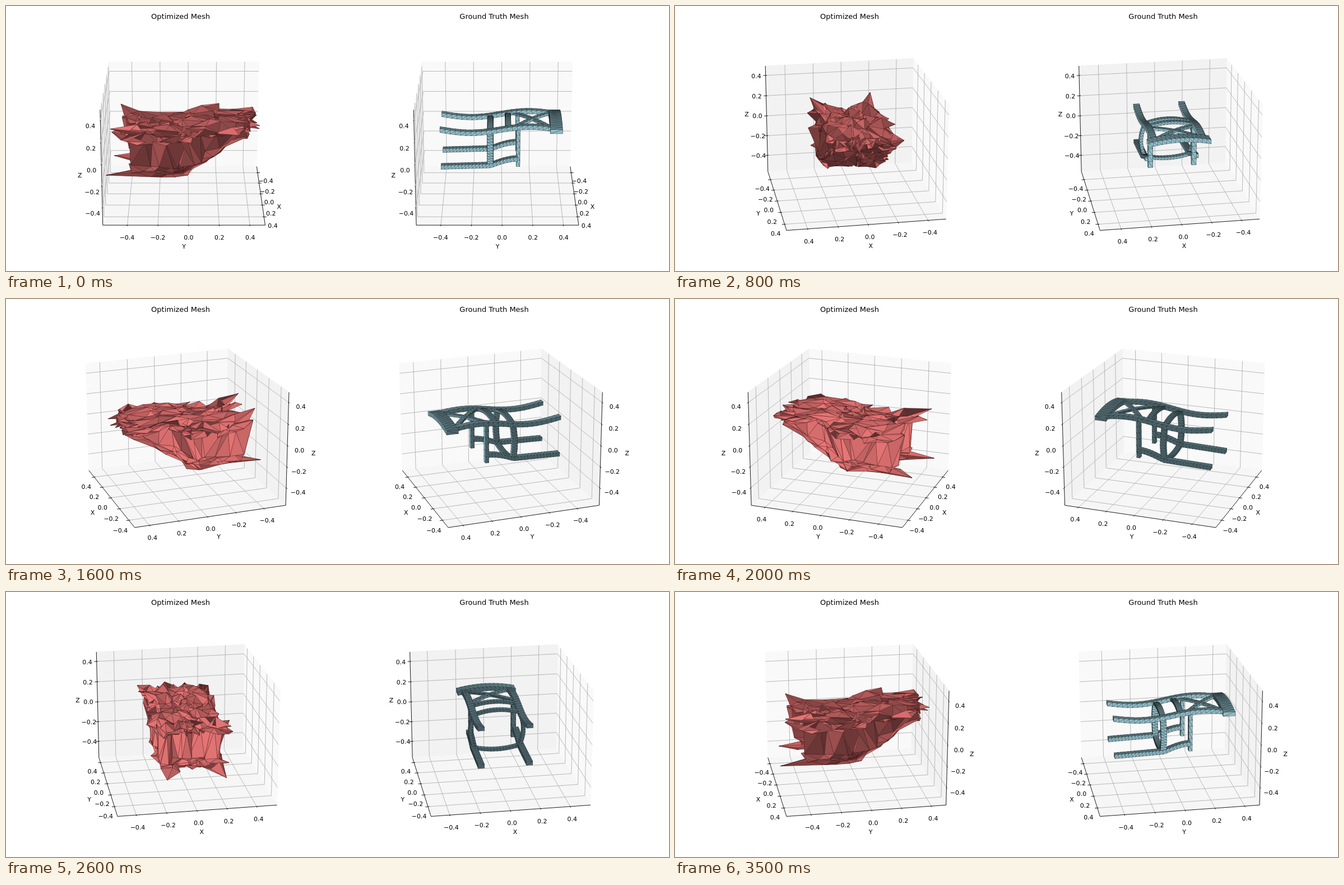
An HTML page with a canvas for the animation above (3.6 s loop, 1183 by 473 pixels).

```html
<!DOCTYPE html>
<html lang="en">
<head>
<meta charset="utf-8">
<title>Mesh turntable</title>
<style>
html, body { margin: 0; width: 100%; height: 100%; overflow: hidden; background: #fff; }
canvas { display: block; width: 1183px; height: 473px; }
</style>
</head>
<body>
<canvas id="stage" width="1183" height="473"></canvas>
<script>
const ctx = document.getElementById('stage').getContext('2d');
const FONT = '"DejaVu Sans", sans-serif';
const SCALE = 2335, CENTER_X = 317.6, CENTER_Y = 239.5, PANEL_STEP = 559.4, DIST = 10;
const ELEV = 20 * Math.PI / 180, SIN_E = Math.sin(ELEV), COS_E = Math.cos(ELEV);

// Axis box in world units; data value v sits at (v - MID) * UNIT.
const HALF = [0.5953, 0.5953, 0.4465];
const MID = [0.0075, -0.03, -0.037];
const UNIT = HALF.map(h => h / 0.53);
const DELTA = HALF.map(h => h * 0.16);
const TICKS = [-0.4, -0.2, 0, 0.2, 0.4];
const TICK_PAD = 0.70, NAME_PAD = 1.521;

const add = (p, q) => p.map((v, i) => v + q[i]);
const sub = (p, q) => p.map((v, i) => v - q[i]);
const dot = (p, q) => p[0] * q[0] + p[1] * q[1] + p[2] * q[2];
const cross = (p, q) => [p[1] * q[2] - p[2] * q[1], p[2] * q[0] - p[0] * q[2], p[0] * q[1] - p[1] * q[0]];
const unit = p => { const l = Math.hypot(...p) || 1; return p.map(v => v / l); };
const mean = ps => ps.reduce(add).map(v => v / ps.length);
const put = (p, i, v) => { const q = p.slice(); q[i] = v; return q; };
const mix = (a, b, t) => a + (b - a) * t;
const clamp = t => Math.min(1, Math.max(0, t));
const bulge = t => 4 * t * (1 - t);

function random(seed) {
  return () => {
    seed = (seed + 0x6D2B79F5) | 0;
    let t = Math.imul(seed ^ (seed >>> 15), 1 | seed);
    t = (t + Math.imul(t ^ (t >>> 7), 61 | t)) ^ t;
    return ((t ^ (t >>> 14)) >>> 0) / 4294967296;
  };
}

const LIGHT = [-0.667, -0.667, 0.333];
function face(points, outward, base, side) {
  const [a, b, c] = points.map(p => [p[0], p[1], p[2] * 4 / 3]);
  const n = unit(cross(sub(b, a), sub(c, a)));
  const facing = dot(n, outward) < 0 ? -side : side;
  const k = 0.36 + 0.31 * (1 + facing * dot(n, LIGHT));
  return { points, fill: `rgb(${base.map(v => Math.round(v * k))})` };
}

// Height of the long S-shaped posts, shared by both meshes.
const postZ = y => 0.144 + 0.0245 * Math.sin(7.1 * (y - 0.02));

// ---- spiky mesh: a noisy sphere pressed into a slab with a wedge below ----
function spikyMesh() {
  const N = 12, rnd = random(11), verts = new Map(), tris = [];
  const jitter = s => (rnd() + rnd() - 1) * s;

  function place(i, j, k) {
    const top = Math.max(Math.abs(i), Math.abs(j), Math.abs(k));
    const [cx, cy, cz] = [i / top, j / top, k / top];
    const upper = cz >= 0;
    const h = (upper ? 1 : -1) * Math.max(Math.abs(cz), 0.15) ** 0.3;
    const corner = Math.min(Math.abs(cx), -cy, Math.abs(cz));
    let y = 0.47 * cy;
    if (cy < -0.8) y = Math.abs(cx) < 0.6 ? -0.31 : upper ? -0.45 : -0.4;
    if (corner > 0.99) y = -0.56;
    const floor = mix(-0.21, 0.1, clamp(y / 0.42));
    const z = mix(floor, postZ(y) + 0.02, (h + 1) / 2);
    const spike = rnd() < 0.07 ? 1.8 : 1;
    return upper
      ? [0.235 * cx + jitter(0.06) * spike, y + jitter(0.11), z + jitter(0.045) * spike]
      : [0.225 * cx + jitter(0.05) * spike, y + jitter(0.05), z + jitter(0.025)];
  }
  function vertex(i, j, k) {
    const key = [i, j, k].join();
    if (!verts.has(key)) verts.set(key, { dir: unit([i, j, k]), pos: place(i, j, k) });
    return verts.get(key);
  }
  for (const sx of [1, -1]) for (const sy of [1, -1]) for (const sz of [1, -1]) {
    const v = (i, j) => vertex(sx * i, sy * j, sz * (N - i - j));
    for (let i = 0; i < N; i++) for (let j = 0; i + j < N; j++) {
      tris.push([v(i, j), v(i + 1, j), v(i, j + 1)]);
      if (i + j < N - 1) tris.push([v(i + 1, j), v(i + 1, j + 1), v(i, j + 1)]);
    }
  }
  return tris.map(t => {
    const normal = ([a, b, c]) => cross(sub(b, a), sub(c, a));
    const pos = t.map(v => v.pos), dir = t.map(v => v.dir);
    // Keep the sphere's winding so folded faces turn dark.
    const turn = Math.sign(dot(normal(dir), mean(dir)));
    return face(pos, normal(pos).map(v => v * turn), [238, 121, 121], 1);
  });
}

// ---- chair frame ----
function chairMesh() {
  const faces = [], cx = -0.015;
  function quad([a, b, c, d], out) {
    for (const t of [[a, b, c], [a, c, d]]) faces.push(face(t, out, [165, 214, 227], -1));
  }
  // Sweeps a box section with half-vectors a and b along path(t), t in 0..1.
  function beam(path, a, b, n) {
    const mids = Array.from({ length: n + 1 }, (_, i) => path(i / n));
    const rings = mids.map(c => [add(add(c, a), b), add(sub(c, a), b), sub(sub(c, a), b), sub(add(c, a), b)]);
    for (let i = 0; i < n; i++) for (let k = 0; k < 4; k++) {
      const m = (k + 1) % 4, q = [rings[i][k], rings[i][m], rings[i + 1][m], rings[i + 1][k]];
      quad(q, sub(mean(q), mean([mids[i], mids[i + 1]])));
    }
    quad(rings[0], sub(mids[0], mids[1]));
    quad(rings[n], sub(mids[n], mids[n - 1]));
  }
  const legZ = y => -0.15 + 0.03 * (y + 0.43) + 0.047 * Math.sin(clamp((y + 0.05) / 0.2) * Math.PI / 2);
  const rail = (x, y0, y1, z) =>
    beam(t => { const y = mix(y0, y1, t); return [x, y, z(y)]; }, [0.023, 0, 0], [0, 0, 0.015], 22);
  const across = (y, z, arch, half = 0.17, wide = 0.02, thick = 0.01) =>
    beam(t => [cx + mix(-half, half, t), y, z + arch * bulge(t)], [0, wide, 0], [0, 0, thick], 14);

  for (const s of [-1, 1]) {
    rail(cx + s * 0.181, -0.43, 0.42, postZ);
    rail(cx + s * 0.181, -0.425, 0.15, legZ);
    beam(t => [cx + s * 0.167, 0.155, mix(0.15, -0.15, t)], [0.017, 0, 0], [0, 0.013, 0], 6);
    beam(t => [cx + s * (0.172 + 0.033 * bulge(t)), -0.055, mix(0.12, -0.145, t)],
      [0.012, 0, 0], [0, 0.021, 0], 12);
    beam(t => [cx + s * mix(-0.17, 0.17, t), mix(0.13, 0.4, t), 0.153 + 0.014 * bulge(t)],
      [0.011, -s * 0.013, 0], [0, 0, 0.008], 10);
  }
  across(-0.055, 0.125, 0.028);
  across(-0.055, -0.142, -0.022);
  across(0.08, 0.148, 0.025);
  across(0.44, 0.146, 0.026, 0.23, 0.045, 0.016);
  return faces;
}

const panels = [
  { title: 'Optimized Mesh', titleX: 311.5, x: CENTER_X, faces: spikyMesh(), edge: 'rgba(25,5,5,.65)', width: 0.38 },
  { title: 'Ground Truth Mesh', titleX: 871, x: CENTER_X + PANEL_STEP, faces: chairMesh(), edge: 'rgba(0,0,0,.7)', width: 0.32 }
];

// ---- drawing ----
function camera(az, x0) {
  const s = Math.sin(az), c = Math.cos(az);
  return p => {
    const near = c * p[0] + s * p[1];
    const depth = near * COS_E + p[2] * SIN_E;
    const k = SCALE / (DIST - depth);
    return [x0 + (c * p[1] - s * p[0]) * k, CENTER_Y - (p[2] * COS_E - near * SIN_E) * k, depth];
  };
}

function trace(pts, close) {
  ctx.beginPath();
  for (const p of pts) ctx.lineTo(p[0], p[1]);
  if (close) ctx.closePath();
}
function line(pts, color) {
  trace(pts);
  ctx.strokeStyle = color;
  ctx.lineWidth = 0.88;
  ctx.stroke();
}

function drawAxes(az, view) {
  const eye = [Math.cos(az), Math.sin(az), 1];
  const front = HALF.map((h, i) => eye[i] < -1e-9 ? -h : h);
  const back = front.map(v => -v);

  ['#f9f9f9', '#f2f2f2', '#f6f6f6'].forEach((color, i) => {
    const j = (i + 1) % 3, k = (i + 2) % 3;
    const p = put(back, j, front[j]);
    trace([back, p, put(p, k, front[k]), put(back, k, front[k])].map(view), true);
    ctx.fillStyle = ctx.strokeStyle = color;
    ctx.lineWidth = 1;
    ctx.fill();
    ctx.stroke();
  });

  ctx.font = `10.95px ${FONT}`;
  for (let i = 0; i < 3; i++) {
    const dir = i === 0 ? 1 : 0, j = (i + 1) % 3, k = (i + 2) % 3;
    const edge = put(back, dir, front[dir]);
    const push = (p, pad) => p.map((v, a) => a === i ? v : v + Math.sign(v) * DELTA[a] * pad);
    const at = TICKS.map(v => (v - MID[i]) * UNIT[i]);

    line([put(edge, i, -HALF[i]), put(edge, i, HALF[i])].map(view), '#000');
    for (const v of at) {
      const p = put(back, i, v);
      line([put(p, j, front[j]), p, put(p, k, front[k])].map(view), '#b0b0b0');
    }
    ctx.fillStyle = '#000';
    at.forEach((v, n) => {
      const p = put(edge, i, v), d = Math.sign(edge[dir]) * DELTA[dir];
      line([put(p, dir, p[dir] - 0.1 * d), put(p, dir, p[dir] + 0.2 * d)].map(view), '#000');
      const [x, y] = view(push(p, TICK_PAD));
      ctx.fillText(TICKS[n].toFixed(1).replace('-', '\u2212'), x, y + 8.3);
    });
    const [x, y] = view(push(put(edge, i, 0), NAME_PAD));
    ctx.fillText('XYZ'[i], x, y + 2.85);
  }
}

function drawFaces(panel, view) {
  const shown = panel.faces.map(f => {
    const pts = f.points.map(view);
    return { pts, fill: f.fill, depth: pts[0][2] + pts[1][2] + pts[2][2] };
  }).sort((a, b) => a.depth - b.depth);
  ctx.strokeStyle = panel.edge;
  ctx.lineWidth = panel.width;
  for (const f of shown) {
    trace(f.pts, true);
    ctx.fillStyle = f.fill;
    ctx.fill();
    ctx.stroke();
  }
}

function draw(deg) {
  const az = deg * Math.PI / 180;
  ctx.fillStyle = '#fff';
  ctx.fillRect(0, 0, 1183, 473);
  ctx.textAlign = 'center';
  ctx.lineJoin = 'round';
  for (const panel of panels) {
    const view = camera(az, panel.x);
    drawAxes(az, view);
    drawFaces(panel, view);
    ctx.font = `13px ${FONT}`;
    ctx.fillStyle = '#000';
    ctx.fillText(panel.title, panel.titleX, 23);
  }
}

let shownStep = -1;
function tick() {
  const step = Math.floor(performance.now() % 3600 / 100);
  if (step !== shownStep) draw((shownStep = step) * 10);
  requestAnimationFrame(tick);
}
tick();
</script>
</body>
</html>
```
